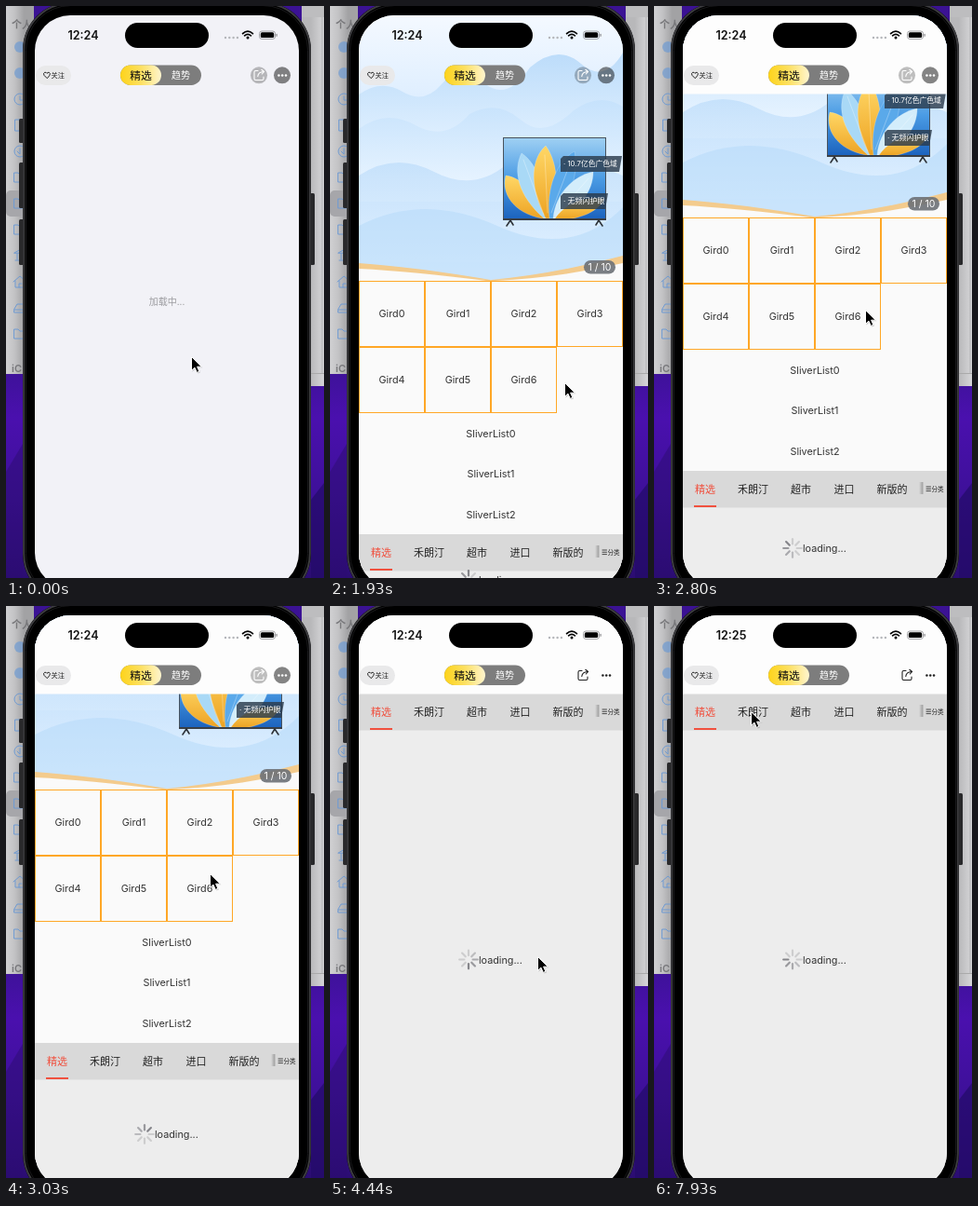
Write an HTML page that moves like this. It is 342 by 614 pixels and loops after 8000 ms.

```html
<!DOCTYPE html>
<html lang="zh-CN">
<head>
<meta charset="utf-8">
<style>
html, body { margin: 0; width: 100%; height: 100%; overflow: hidden; }
svg { display: block; width: 342px; height: 614px; font-family: Inter, "Noto Sans CJK SC", "Noto Sans CJK", sans-serif; }
</style>
</head>
<body>
<svg id="stage" viewBox="0 0 342 614"></svg>
<script>
const LOOP = 8000;
const TICKS = [0, 50, 200, 290, 470, 790, 870, 960, 1140, 1490, 1580, 1760, 1930, 2140, 2290, 2410, 2470, 2530,
  2800, 2880, 2950, 3030, 3140, 3360, 3480, 3760, 4140, 4380, 4440, 4790, 5120, 5590, 5770, 6120, 6420, 6510,
  7100, 7490, 7930];
const SCROLL = [[1930, 0], [2140, 36], [2290, 58], [2530, 64], [2800, 68], [3030, 98], [3140, 130], [3360, 330], [3480, 473]];
const POINTER = [[0, 199, 376], [50, 203, 376], [290, 214, 375], [960, 261, 480], [1140, 256, 454], [1580, 252, 436],
  [1760, 251, 423], [1930, 252, 404], [2290, 252, 386], [2530, 250, 380], [2800, 227, 326], [3030, 219, 287],
  [3140, 216, 270], [3480, 215, 355], [3760, 217, 384], [4140, 222, 379], [4440, 223, 376], [6420, 223, 376],
  [6510, 222, 374], [7100, 142, 250], [7490, 103, 165], [7930, 104, 113]];
const SPIN = [[0, -31], [4440, 4.5], [6510, 19.1], [7930, 30.4]];
const BANNER_FADE = [[620, 0], [960, 1]];
const TAB_TOP = 567, TAB_PIN = 94, SCREEN_END = 625;

const rect = (x, y, w, h, fill, r = 0, more = '') =>
  `<rect x="${x}" y="${y}" width="${w}" height="${h}" rx="${r}" fill="${fill}" ${more}/>`;
const circle = (x, y, r, fill, more = '') => `<circle cx="${x}" cy="${y}" r="${r}" fill="${fill}" ${more}/>`;
const shape = (d, fill, more = '') => `<path d="${d}" fill="${fill}" ${more}/>`;
const line = (d, stroke, width = 1, more = '') =>
  shape(d, 'none', `stroke="${stroke}" stroke-width="${width}" stroke-linecap="round" stroke-linejoin="round" ${more}`);
const text = (s, x, y, size, fill, more = 'text-anchor="middle"') =>
  `<text x="${x}" y="${y + size * .37}" font-size="${size}" fill="${fill}" ${more}>${s}</text>`;
const group = (id, body, more = '') => `<g id="${id}" ${more}>${body}</g>`;
const gradient = (id, stops, dir = 'x2="0" y2="1"') => `<linearGradient id="${id}" ${dir}>` +
  stops.map(([at, color]) => `<stop offset="${at}" stop-color="${color}"/>`).join('') + '</linearGradient>';

function desktop() {
  const blue = '#6e9ad2';
  const folder = y => line(`M9 ${y - 5}h4l2 2h7v8h-13z`, blue);
  return rect(0, 0, 342, 614, 'url(#wall)') +
    shape('M0 500L18 470V614H0z', '#2c0d72', 'opacity=".5"') + shape('M328 530L342 512V614H328z', '#230b68', 'opacity=".7"') +
    rect(0, 0, 30, 395, 'url(#side)') + rect(318, 0, 24, 408, 'url(#pane)') +
    rect(318, 0, 24, 12, '#bdbdbf') + rect(339.5, 12, 1, 383, '#b2b2b4') + rect(318, 394, 24, 1, '#aaa') +
    rect(0, 198, 30, 28, '#a6a6aa', 5) +
    text('个人', 6, 20, 11, '#77777a', 'font-weight="600"') + text('iC', 6, 389, 11, '#77777a', 'font-weight="600"') +
    circle(15, 44, 6, blue, 'opacity=".7"') + circle(15, 72, 6, blue, 'opacity=".7"') +
    circle(15, 100, 6, 'none', `stroke="${blue}"`) + line('M15 97v4h3', blue) +
    line('M10 122h8v12h-8z', blue) +
    circle(15, 156, 6, 'none', `stroke="${blue}"`) + line('M15 153v6l-3-3', blue) +
    [184, 212, 240, 352].map(folder).join('') +
    line('M9 265l7-4 6 4zM10 273h12M12 266v6M16 266v6', blue) +
    line('M8 296l7-6 7 6M10 295v7h10v-7M14 302v-4h3', blue) +
    line('M9 325l3-5h8v9H9z M9 326h10', blue);
}

function phoneBody() {
  const buttons = [[14, 121, 26], [14, 168, 49], [14, 229, 49], [327, 201, 77]];
  return buttons.map(([x, y, h]) => rect(x, y, 5, h, '#29292b', 1.5)).join('') +
    rect(18, -4, 310, 643, '#000', 51) +
    rect(19.2, -2.8, 307.6, 640.6, 'none', 50, 'stroke="#3c3c3f" stroke-width="2"') +
    rect(21.5, -.5, 303, 636, 'none', 48, 'stroke="#18181a"');
}

function television() {
  const petal = (d, fill) => shape(d, fill, 'stroke="#fff" stroke-opacity=".35" stroke-width=".6"');
  return rect(186.5, 141.5, 110, 88, 'url(#tv)', 0, 'stroke="#48525c"') +
    petal('M228 228C196 222 184 200 189 182C207 184 226 205 232 228z', 'url(#gold)') +
    petal('M230 228C203 204 196 178 206 158C224 170 233 200 234 228z', '#a9d9f6') +
    petal('M232 228C212 190 218 162 232 150C247 170 246 205 237 228z', 'url(#gold)') +
    petal('M236 228C232 196 244 166 263 156C268 182 256 212 242 228z', '#5aa9ea') +
    petal('M240 228C242 202 262 182 283 178C283 203 262 222 246 228z', '#d3edfb') +
    petal('M242 228C254 211 274 204 295 207C288 222 266 229 250 229z', 'url(#gold)') +
    line('M230 224L208 165M234 222L231 160M238 222L260 164M244 224L278 185', '#fff', .6, 'opacity=".5"') +
    rect(186, 228, 111, 2, '#3a3f45') +
    line('M194 230l-4 6M194 230l3 5M289 230l-3 5M289 230l4 6', '#2e3338', 1.6) +
    shape('M251 161H314L311 178H248V164z', '#2b3b4c', 'opacity=".82"') +
    shape('M251 201H299L296 218H248V204z', '#2b3b4c', 'opacity=".82"') +
    text('· 10.7亿色广色域', 251, 169.5, 7.8, '#fff', '') + text('· 无频闪护眼', 251, 209.5, 8, '#fff', '');
}

function banner() {
  return rect(31, 10, 284, 285, 'url(#sky)') +
    shape('M31 95Q55 78 78 92T120 84Q140 60 165 82T215 66Q245 40 270 62T315 50V150H31z', 'url(#hillA)') +
    shape('M31 132Q60 110 92 128T150 116Q180 100 205 122T262 112Q290 92 315 108V210H31z', 'url(#hillB)') +
    shape('M31 182Q70 156 112 178T190 170Q240 150 315 182V275H31z', 'url(#hillA)', 'opacity=".75"') +
    shape('M31 236Q100 200 180 236T315 216V295H31z', '#b9dcfb', 'opacity=".6"') +
    shape('M31 276Q90 280 173 294Q240 288 315 268V295H31z', '#f3cb8d') +
    shape('M31 282Q90 285 168 295H31z M178 295Q250 291 315 276V295z', '#fafafa') +
    television() +
    rect(273, 273, 34, 14.5, '#6d7277', 7.2, 'opacity=".9"') + text('1 / 10', 290, 280.3, 10.5, '#fff');
}

function lists() {
  let out = rect(31, 295, 284, 400, '#fafafa');
  for (let i = 0; i < 7; i++) {
    const x = 31 + i % 4 * 71, y = 295 + (i >> 2) * 71;
    out += rect(x + .5, y + .5, 70, 70, 'none', 0, 'stroke="#ffa726"') + text('Gird' + i, x + 35.5, y + 35.5, 10.8, '#333');
  }
  for (let i = 0; i < 3; i++) out += text('SliverList' + i, 173, 459 + i * 43.3, 10.8, '#333');
  return out;
}

function tabs() {
  const names = [['精选', 55], ['禾朗汀', 106.5], ['超市', 158], ['进口', 204.5], ['新版的', 256]];
  return rect(31, 0, 284, 600, '#ededed') + rect(31, 0, 284, 39.5, '#d9d9d9') +
    names.map(([name, x], i) => text(name, x, 19.5, 11, i ? '#222' : '#f0513f')).join('') +
    rect(43, 37, 24, 2, '#f0513f') +
    rect(285, 12, 5, 13, 'url(#shade)') +
    line('M293 17h4.5M293 19.3h4.5M293 21.6h4.5', '#222', .8) + text('分类', 305, 19.4, 6.6, '#222');
}

function loader() {
  let out = '';
  for (let i = 0; i < 8; i++)
    out += line('M0 -4.6V-9.8', '#3c3c44', 2.2, `class="spoke" transform="translate(149) rotate(${i * 45})"`);
  return out + text('loading...', 160, 0, 10.8, '#333', '');
}

function toolbar() {
  const wifi = 'M254.6 29.6Q260 24.6 265.4 29.6M256.6 31.8Q260 28.8 263.4 31.8';
  return group('headerFill', rect(31, 10, 284, 84.5, '#fdfdfd')) +
    rect(128, 18, 90, 27, '#000', 13.5) +
    text('12:24', 83, 31, 12.6, '#111', 'id="clock" text-anchor="middle" font-weight="600"') +
    [236, 240.3, 244.6, 248.9].map(x => circle(x, 34, 1.2, '#b4b6ba')).join('') +
    line(wifi, '#000', 1.7) + circle(260, 34, 1.5, '#000') +
    rect(272.5, 27, 17, 8.4, 'none', 2.6, 'stroke="#8b8b8e" stroke-width=".8"') + rect(273.8, 28.3, 14.4, 5.8, '#000', 1.6) +
    rect(290.5, 29.8, 1.2, 3, '#8b8b8e', .6) +
    rect(32, 64, 38, 21, '#e9e9ea', 10.5) +
    line('M44 77.4L41 74.4Q39.6 72 41.8 71.2Q43.3 71 44 72.4Q44.9 71 46.3 71.3Q48.3 72.2 46.9 74.4z', '#222', 1) +
    text('关注', 55.7, 74.5, 7.2, '#222') +
    rect(123, 63.5, 87, 21.5, '#7d7d7d', 10.7) + rect(123, 63.5, 44, 21.5, 'url(#pill)', 10.7) +
    text('精选', 145, 74.3, 11.8, '#111', 'text-anchor="middle" font-weight="500"') + text('趋势', 188, 74.3, 10, '#fff') +
    group('discs', circle(272, 74.3, 9, '#000', 'opacity=".25"') + circle(297, 74.3, 9, '#000', 'opacity=".48"')) +
    group('icons', line('M271 69.5h-2.5q-1.5 0-1.5 1.5v7q0 1.5 1.5 1.5h7q1.5 0 1.5-1.5v-2M270.8 75.5q.4-4.6 6.4-5M274.8 68.3l2.8 2.2-2.3 2.5', 'currentColor', 1.1) +
      [293.4, 297.2, 301].map(x => circle(x, 74.4, 1.25, 'currentColor')).join(''));
}

const stage = document.getElementById('stage');
stage.innerHTML = '<defs>' +
  gradient('wall', [[.62, '#3b1294'], [.72, '#4a10ae'], [.86, '#3d1098'], [1, '#2b0d72']]) +
  gradient('side', [[0, '#d0d0d2'], [.3, '#c3c3c5'], [.65, '#a2a2a4']], '') +
  gradient('pane', [[.4, '#b8b8ba'], [1, '#d6d6d8']], '') +
  gradient('sky', [[0, '#f4f9ff'], [.35, '#dcedff'], [.75, '#d3e9ff'], [1, '#e4f2ff']]) +
  gradient('hillA', [[0, '#bcdcfa'], [1, '#e2f1ff']]) +
  gradient('hillB', [[0, '#c6e2fc'], [.8, '#e6f3ff']]) +
  gradient('tv', [[0, '#9fd0f3'], [.5, '#4a9be4'], [1, '#1b62bd']]) +
  gradient('gold', [[0, '#ffd766'], [1, '#eda323']]) +
  gradient('pill', [[0, '#fdd31a'], [.5, '#fde061'], [1, '#fff5cf']], '') +
  gradient('shade', [[0, '#d9d9d9'], [.8, '#a2a2a2'], [1, '#e0e0e0']], '') +
  `<clipPath id="screen">${rect(31, 10, 284, SCREEN_END - 10, '#000', 38)}</clipPath></defs>` +
  desktop() + phoneBody() +
  `<g clip-path="url(#screen)">${rect(31, 10, 284, 615, '#f2f2f7')}` +
  group('waiting', text('加载中...', 173, 317, 10, '#9b9b9f')) +
  group('page', group('scroller', group('banner', banner()) + lists()) + group('tabs', tabs()) + group('loader', loader())) +
  toolbar() + '</g>' +
  group('pointer', shape('M1.5 1.5V16.5L5 13.2L7.4 18.6L10 17.4L7.7 12.3H12.5z', '#000', 'opacity=".18"') +
    shape('M.5 .5V15.3L3.9 12.1L6.3 17.4L8.9 16.3L6.6 11.2H11.4z', '#000', 'stroke="#fff" stroke-width="1"'));

const el = {};
stage.querySelectorAll('[id]').forEach(node => el[node.id] = node);
const spokes = stage.querySelectorAll('.spoke');

function sample(keys, t, column = 1) {
  const next = keys.findIndex(key => key[0] > t);
  if (next === 0) return keys[0][column];
  if (next < 0) return keys[keys.length - 1][column];
  const a = keys[next - 1], b = keys[next];
  return a[column] + (b[column] - a[column]) * (t - a[0]) / (b[0] - a[0]);
}
const move = (node, x, y) => node.setAttribute('transform', `translate(${x} ${y})`);
const show = (node, on) => node.setAttribute('display', on ? 'inline' : 'none');

function draw(time) {
  const t = TICKS.filter(tick => tick <= time).pop();
  const scroll = sample(SCROLL, t);
  const tabTop = Math.max(TAB_PIN, TAB_TOP - scroll);
  show(el.waiting, t < 470);
  show(el.page, t >= 470);
  el.banner.setAttribute('opacity', sample(BANNER_FADE, t));
  move(el.scroller, 0, -scroll);
  move(el.tabs, 0, tabTop);
  move(el.loader, 0, (tabTop + 40 + SCREEN_END) / 2);
  const active = Math.floor(sample(SPIN, t));
  spokes.forEach((spoke, i) => {
    const age = (((active - i) % 8) + 8) % 8;
    spoke.setAttribute('opacity', Math.max(.18, .58 - age * .1));
  });
  el.headerFill.setAttribute('opacity', Math.min(1, scroll / 65));
  show(el.discs, scroll < 200);
  el.icons.setAttribute('color', scroll < 200 ? '#fff' : '#222');
  el.clock.textContent = t < 7100 ? '12:24' : '12:25';
  move(el.pointer, sample(POINTER, t), sample(POINTER, t, 2));
}

function loop() {
  draw(performance.now() % LOOP);
  requestAnimationFrame(loop);
}
loop();
</script>
</body>
</html>
```
